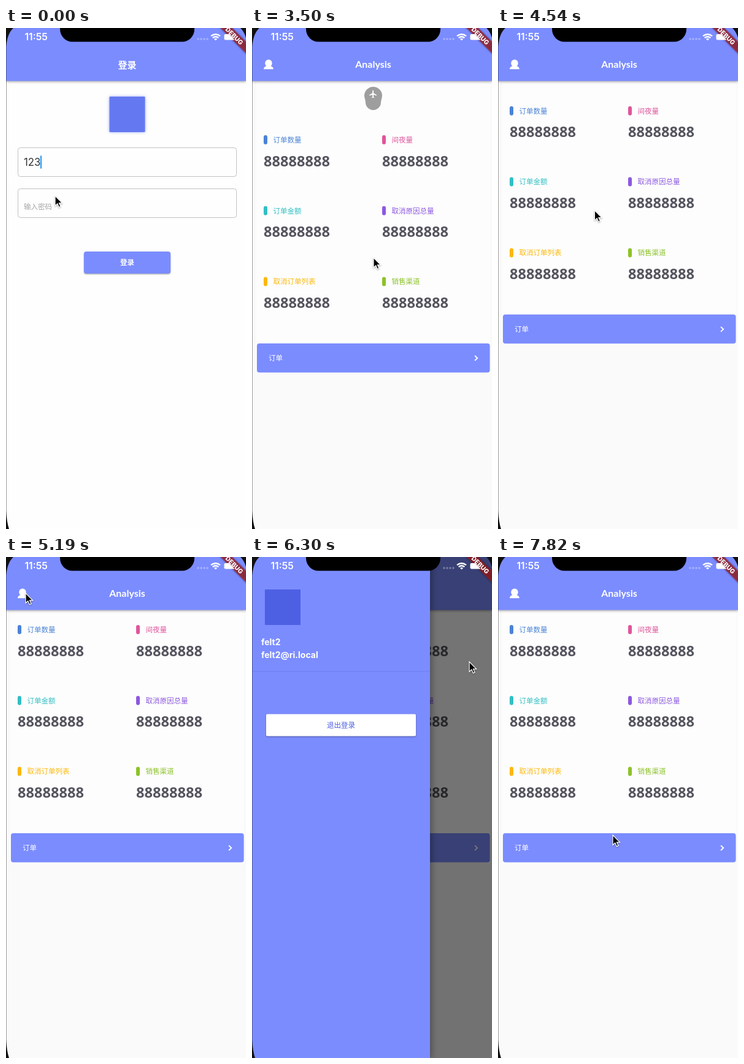
Write an HTML page that moves like this. It is 391 px wide and 818 px high and loops after 8000 ms.

```html
<!DOCTYPE html>
<html lang="zh-CN">
<head>
<meta charset="utf-8">
<title>登录</title>
<style>
  html, body { margin: 0; width: 100%; height: 100%; overflow: hidden; background: #fefefe; }
  svg { display: block; width: 100%; height: 100%; }
  text { font-family: Inter, "Noto Sans CJK SC", "Noto Sans CJK", sans-serif; font-size: 11.5px; }
  .num { font: 700 23.6px "Noto Sans", "Open Sans", sans-serif; fill: #55555f; }
  .title { font: 700 16px Lato, sans-serif; }
  .head { font-size: 15px; }
  .input { font-size: 16.8px; fill: #333; }
  .user { font-size: 14px; font-weight: 700; fill: #fff; }
  .bold { font-weight: 700; fill: #fff; }
  .mid { text-anchor: middle; }
  .field { fill: none; stroke: #c2c2c2; }
  .lift { filter: drop-shadow(0 1px 1.2px rgba(0,0,0,.38)); }
</style>
</head>
<body>
<svg viewBox="0 0 391 818">
  <rect width="391" height="818" fill="#fefefe"/>

  <g id="login">
    <rect x="168.5" y="112" width="58" height="58" rx="1" fill="#6479f1"
      style="filter:drop-shadow(0 0 2.5px rgba(100,121,241,.6))"/>
    <rect class="field" x="19.5" y="195.5" width="356" height="47" rx="4"/>
    <rect class="field" x="19.5" y="262.5" width="356" height="47" rx="4"/>
    <text class="input" x="29" y="225">123</text>
    <text id="hint" x="29" y="296.3" fill="#a6a6a6">输入密码</text>
    <g fill="#222">
      <circle id="dot1" cx="33" cy="287.5" r="2.6"/>
      <circle id="dot2" cx="40.2" cy="287.5" r="2.6"/>
    </g>
    <text id="digit" class="input" y="292"></text>
    <rect id="caret1" x="56" y="208.5" width="2" height="21" fill="#2196f3"/>
    <rect id="caret2" y="275" width="2" height="21" fill="#2196f3"/>
    <rect class="lift" x="127" y="365" width="141" height="36" rx="4" fill="#7b8cff"/>
    <text class="mid bold" x="197.5" y="387.3">登录</text>
  </g>

  <g id="home">
    <rect y="86" width="391" height="732" fill="#fafafa"/>
    <rect id="card" x="7" y="86" width="381" fill="#fdfdfd"/>
    <g id="drop">
      <path fill="#9e9e9e" d="M183 110.5a14.5 14.5 0 0 1 29 0c0 4-2 7-2 11a12.5 12.5 0 0 1-25 0c0-4-2-7-2-11z"/>
      <path fill="#fff" transform="translate(190 100.6) scale(.62)"
        d="M21 16v-2l-8-5V3.5a1.5 1.5 0 0 0-3 0V9l-8 5v2l8-2.5V19l-2 1.5V22l3.5-1 3.5 1v-1.5L13 19v-5.5l8 2.5z"/>
    </g>
    <g id="list">
      <g id="cells"></g>
      <rect x="8" y="451" width="379.5" height="47.5" rx="4" fill="#7b8cff"/>
      <text x="27" y="479.3" fill="#fff">订单</text>
      <path d="M363 471l4.2 4-4.2 4" fill="none" stroke="#fff" stroke-width="1.8"/>
    </g>
  </g>

  <rect width="391" height="86.5" fill="#7b8cff" style="filter:drop-shadow(0 1.5px 2px rgba(0,0,0,.4))"/>
  <text id="loginTitle" class="mid bold head" x="197.5" y="65.6">登录</text>
  <g id="homeTitle" fill="#fff">
    <text class="title mid" x="197.5" y="64.5">Analysis</text>
    <ellipse cx="27" cy="57.6" rx="5.7" ry="6"/>
    <path d="M19 67.3c0-3.3 2.5-4.500 5.500-5.500h5c3 1 5.300 2.200 5.300 5.500z"/>
  </g>

  <rect id="scrim" width="391" height="818"/>

  <g id="drawer">
    <rect x="-10" width="300" height="818" fill="#7b8cff" style="filter:drop-shadow(3px 0 5px rgba(0,0,0,.3))"/>
    <rect x="21" y="53" width="58" height="58" fill="#4d60e4"/>
    <text class="user" x="15" y="143.800">felt2</text>
    <text class="user" x="15" y="164.800">felt2@ri.local</text>
    <path d="M0 186.500H290" stroke="#6f7ff0"/>
    <rect class="lift" x="23" y="256.500" width="244" height="36" rx="2" fill="#fff"/>
    <text class="mid" x="145" y="279" font-weight="500" fill="#4a5ce0">退出登录</text>
  </g>

  <g transform="translate(372 13) rotate(45)">
    <rect x="-50" y="-6.700" width="100" height="13.400" opacity=".5" style="filter:blur(1.500px)"/>
    <rect x="-50" y="-6.700" width="100" height="13.400" fill="#b71c1c" opacity=".63"/>
  </g>

  <g fill="#fff">
    <text x="30.500" y="20.300" style="font-size:15.600px;font-weight:600">11:55</text>
    <path d="M313 18h16" stroke="#fff" stroke-width="3.600" stroke-linecap="round"
      stroke-dasharray="0 5" opacity=".32"/>
    <g fill="none" stroke="#fff" stroke-width="2.300">
      <path d="M334 13.200q7.500-6 15 0"/><path d="M336.700 16.200q4.800-3.800 9.600 0"/>
    </g>
    <path d="M341.500 20.500l-2.600-2.600q2.600-1.900 5.200 0z"/>
    <path d="M357.500 10h6l9 9.500h-15q-2 0-2-2V12q0-2 2-2z"/>
    <text class="mid" transform="translate(372 13) rotate(45)" y="3.700"
      style="font-size:10.200px;font-weight:800">DEBUG</text>
  </g>
  <path d="M88 0V2A20 20.500 0 0 0 108 22.500H287A20 20.500 0 0 0 307 2V0z"/>
  <path d="M0 0H12Q2 9 .4 30V788Q1 806 5 818H0zM382 0Q388 6 391 16V0z" fill="#111"/>

  <path id="cursor" d="M0 0V16.300L3.800 12.800 6.300 18.600 9 17.400 6.500 11.800H11.600z"
    stroke="#fff" stroke-width="1.200" style="filter:drop-shadow(0 1px 1px rgba(0,0,0,.35))"/>
</svg>

<script>
const LOOP = 8000, FOCUS = 1150, TYPE = 1840, HOME = 3200, REST = 4430;
const PULL = 64, DRAWER = 290;
const $ = id => document.getElementById(id);

const cells = [
  ['订单数量', '#4a83d6'], ['间夜量', '#e0559c'],
  ['订单金额', '#32bfc3'], ['取消原因总量', '#8c58e0'],
  ['取消订单列表', '#fdb80a'], ['销售渠道', '#8cc22a']
];
$('cells').innerHTML = cells.map(([name, color], i) => {
  const x = i % 2 ? 212 : 19, y = 118.5 + 115.8 * (i >> 1);
  return `<rect x="${x}" y="${y - 7.5}" width="6" height="15" rx="3" fill="${color}"/>
    <text x="${x + 15.5}" y="${y + 4.3}" font-weight="500" fill="${color}">${name}</text>
    <text class="num" x="${x}" y="${y + 43}">88888888</text>`;
}).join('');

// Pointer trips: begin, end, x, y.
const trips = [
  [60, 350, 94, 300], [350, 970, 46, 285], [2200, 2960, 198, 375],
  [4420, 5190, 32, 59], [5720, 6300, 354, 171], [6960, 7820, 187, 454]
];

const ramp = (t, a, b) => Math.min(1, Math.max(0, (t - a) / (b - a)));
const easeOut = p => Math.sin(p * Math.PI / 2);
const show = (id, on) => $(id).style.display = on ? '' : 'none';
const fade = (id, alpha) => $(id).style.opacity = alpha;
const shift = (id, x, y) => $(id).setAttribute('transform', `translate(${x} ${y})`);

// Critically damped spring from 0 to 1.
function spring(t, from) {
  const u = Math.max(0, t - from) * .0163;
  return 1 - (1 + u) * Math.exp(-u);
}

function pointer(t) {
  return trips.reduce(([x, y], [a, b, u, v]) => {
    const p = easeOut(ramp(t, a, b));
    return [x + (u - x) * p, y + (v - y) * p];
  }, [80, 274]);
}

function pullAt(t) {
  const out = PULL * easeOut(ramp(t, HOME, 3500));
  return out * Math.exp(-Math.max(0, t - REST) / 83);
}

function drawLogin(t) {
  const typed = Math.min(3, Math.max(0, Math.floor((t - TYPE) / 180) + 1));
  const x = 29.5 + 7.5 * (typed - 1);
  show('hint', !typed);
  show('dot1', typed > 1);
  show('dot2', typed > 2);
  $('digit').textContent = '124'.charAt(typed - 1);
  $('digit').setAttribute('x', x);
  $('caret2').setAttribute('x', typed ? x + 8.5 : 28);
  fade('caret1', t < FOCUS ? 1 - ramp(t, 300, 450) + ramp(t, 750, 850) : 0);
  fade('caret2', t < FOCUS ? 0 : 1 - (typed ? ramp(t, 2800, 3020) : ramp(t, 1350, 1550)));
}

function draw(t) {
  const home = t >= HOME;
  show('login', !home);
  show('loginTitle', !home);
  show('home', home);
  show('homeTitle', home);
  if (!home) drawLogin(t);

  const pull = pullAt(t);
  shift('list', 0, pull);
  shift('drop', 0, pull - PULL);
  $('card').setAttribute('height', 413 + pull);
  fade('drop', 1 - ramp(t, 3560, 3740));

  const open = spring(t, 5510) - spring(t, 6870);
  show('drawer', open > .001);
  shift('drawer', DRAWER * (open - 1), 0);
  fade('scrim', .54 * Math.max(0, open) ** .6);

  shift('cursor', ...pointer(t));
}

const start = performance.now();
function tick(now) {
  draw(Math.max(0, now - start) % LOOP);
  requestAnimationFrame(tick);
}
draw(0);
requestAnimationFrame(tick);
</script>
</body>
</html>
```
